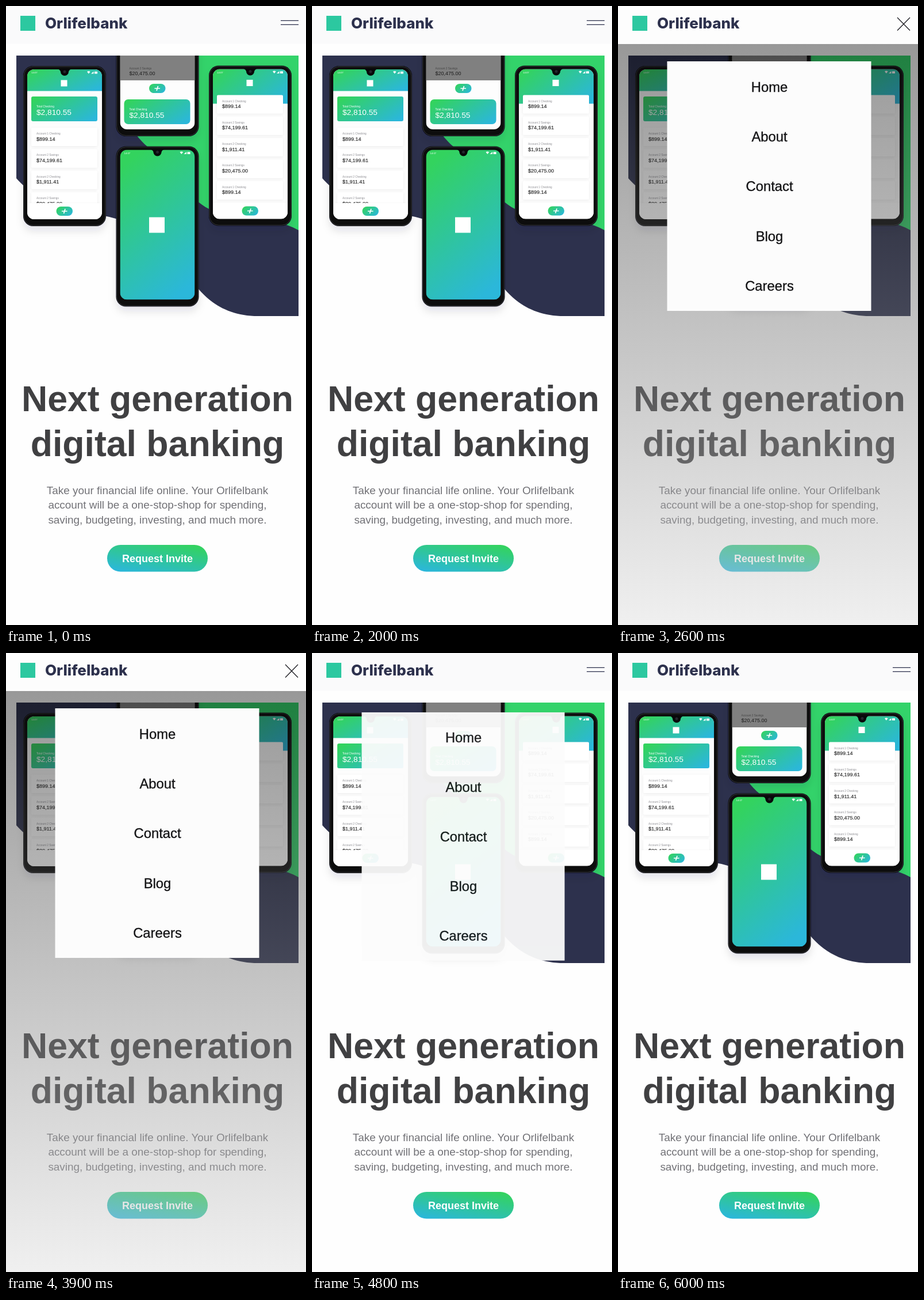
An HTML page that plays this animation: 522x1074 px, repeating every 6100 ms.

```html
<!DOCTYPE html>
<html lang="en">
<head>
<meta charset="utf-8">
<title>Digital banking</title>
<style>
  html, body { margin: 0; width: 100%; height: 100%; overflow: hidden; background: #fefefe; }
  svg { display: block; width: 100vw; height: 100vh; }
  text { font-family: "Liberation Sans", Arial, sans-serif; }
  .brand { font: 800 26px Inter, sans-serif; fill: #2d314d; }
  .title { font-size: 62.6px; font-weight: 700; fill: #404042; }
  .copy { font-size: 18.9px; fill: #717176; }
  .button { font-size: 18px; font-weight: 700; fill: #fff; }
  .link { font-size: 23.8px; fill: #151517; stroke: #151517; stroke-width: .35; }
  .mid { text-anchor: middle; }
</style>
</head>
<body>
<svg viewBox="0 0 522 1074" preserveAspectRatio="none">
  <defs>
    <linearGradient id="brandGrad" x1="0" y1=".2" x2="1" y2=".8">
      <stop stop-color="#33d35e"/><stop offset="1" stop-color="#2bb7da"/>
    </linearGradient>
    <linearGradient id="splashGrad" x1=".3" y1="0" x2=".7" y2="1">
      <stop stop-color="#33d35e"/><stop offset="1" stop-color="#2bb7da"/>
    </linearGradient>
    <linearGradient id="buttonGrad" x1=".15" y1="1" x2=".85" y2="0">
      <stop stop-color="#2bb7da"/><stop offset="1" stop-color="#33d35e"/>
    </linearGradient>
    <linearGradient id="dimGrad" x1="0" y1="0" x2="0" y2="1">
      <stop stop-color="#000"/><stop offset="1" stop-color="#dadada"/>
    </linearGradient>
    <clipPath id="heroClip"><rect x="18" y="86" width="491" height="560"/></clipPath>
    <clipPath id="screenClip"><rect x="7" y="6" width="130" height="260" rx="12"/></clipPath>
    <filter id="shadow" x="-20%" y="-10%" width="140%" height="125%">
      <feDropShadow dx="0" dy="9" stdDeviation="7" flood-color="#223" flood-opacity=".1"/>
    </filter>
    <filter id="cardShadow" x="-10%" y="-20%" width="120%" height="150%">
      <feDropShadow dx="0" dy="1" stdDeviation="2" flood-opacity=".07"/>
    </filter>
  </defs>

  <rect width="522" height="1074" fill="#fefefe"/>
  <g id="hero" clip-path="url(#heroClip)">
    <path fill="#2d314d" d="M18 86H509V538H432C387 536 356 516 335 491C300 440 260 385 180 366C105 350 60 345 18 299Z"/>
    <path fill="#33d36a" d="M193 86C195 190 222 222 245 243C290 290 318 334 353 352C400 372 460 362 509 389V86Z"/>
  </g>
  <g id="copy"></g>
  <rect x="176" y="935" width="175" height="46.500" rx="23.200" fill="url(#buttonGrad)"/>
  <text class="button mid" x="263.500" y="964.500">Request Invite</text>

  <rect id="dim" y="66" width="522" height="1008" fill="url(#dimGrad)" opacity=".4"/>
  <rect id="header" width="522" height="65.500"/>
  <rect x="25" y="17" width="26" height="26" fill="#2cc8a0"/>
  <text class="brand" x="68" y="38.500">Orlifelbank</text>
  <path id="burger" d="M478 25.300H509M478 32.300H509" stroke="#2d314d" stroke-width="1.300"/>
  <path id="cross" d="M486 20L508 42.500M508 20L486 42.500" stroke="#1c1c22" stroke-width="1.300"/>
  <g id="menu"><rect x="-177.500" y="-216.500" width="355" height="433" fill="#fcfcfc"/></g>
</svg>
<script>
const $ = id => document.getElementById(id);
const rect = (x, y, w, h, fill, rx = 0, extra = '') =>
  `<rect x="${x}" y="${y}" width="${w}" height="${h}" rx="${rx}" fill="${fill}" ${extra}/>`;
const text = (x, y, size, fill, str, extra = '') =>
  `<text x="${x}" y="${y}" font-size="${size}" fill="${fill}" ${extra}>${str}</text>`;
const brand = 'url(#brandGrad)';

const CHECK1 = ['Account 1 Checking', '$899.14'];
const SAVE2 = ['Account 2 Savings', '$74,199.61'];
const CHECK2 = ['Account 2 Checking', '$1,911.41'];
const SAVE3 = ['Account 2 Savings', '$20,475.00'];

// Phone parts use coordinates relative to the phone's top left corner.
const account = ([label, value], y) =>
  rect(14, y, 115, 32, '#fff', 2, 'filter="url(#cardShadow)"') +
  text(23, y + 12, 4.7, '#8b8b90', label) +
  text(23, y + 22.6, 9, '#333', value, 'stroke="#333" stroke-width=".2"');

const totalCard = (y, r) =>
  rect(14, y, 115, 43, brand, r) +
  text(23, y + 19, 4.7, '#fff', 'Total Checking') +
  text(23, y + 32, 13.7, '#fff', '$2,810.55');

const plus = y => rect(57.500, y, 28.500, 16, brand, 8) +
  `<path d="M67 ${y + 8}h9.500M73 ${y + 4}l-2.500 8" stroke="#fff" stroke-width="1.700"/>`;

const bottomBar = rect(7, 238, 130, 28, '#fff', 0, 'filter="url(#cardShadow)"') + plus(244);

const statusBar = text(14, 13, 4.3, '#fff', '14:07') +
  `<path d="M111 10q2.800-2 5.600 0l-2.800 3.500zM118 13.500l4.500-4v4zM124 9.700h5v3.800h-5z" fill="#fff"/>`;

const notch = `<path d="M59 5Q64 6 65 10A7 7 0 0 0 79 10Q80 6 85 5Z" fill="#08080a"/>
  <circle cx="72" cy="10" r="2.500" fill="#24262c"/>`;

const phone = (x, y, screen, face = true) => `<g transform="translate(${x} ${y})">
  <g filter="url(#shadow)">${rect(0, 0, 144, 278, '#08080a', 17)}</g>
  ${rect(1.2, 1.2, 141.6, 275.6, 'none', 16, 'stroke="#44454b" stroke-width=".7"')}
  <g clip-path="url(#screenClip)">${screen}</g>${face ? statusBar + notch : ''}</g>`;

const white = rect(7, 6, 130, 260, '#fdfdfd');
const logo = (x, y, size) => rect(x - size / 2, y - size / 2, size, size, '#fff');

const overview = white + rect(7, 6, 130, 37.500, brand) + logo(71, 30, 11) + totalCard(53, 3) +
  [CHECK1, SAVE2, CHECK2, SAVE3].map((a, i) => account(a, 107 + i * 37.4)).join('') + bottomBar;

const accounts = white + rect(7, 6, 130, 60, brand) + logo(71, 30, 11) +
  [CHECK1, SAVE2, CHECK2, SAVE3, CHECK1].map((a, i) => account(a, 51 + i * 37.3)).join('') + bottomBar;

const transfer = white + rect(7, 6, 130, 175, '#808080') +
  text(23, 161.500, 4.7, '#444', SAVE3[0]) +
  text(23, 172, 9, '#1d1d1d', SAVE3[1]) +
  plus(187) + totalCard(214, 7);

const splash = rect(7, 6, 130, 260, 'url(#splashGrad)') + logo(71, 136.500, 27);

$('hero').innerHTML += phone(30, 104, overview) + phone(191.500, -52, transfer, false) +
  phone(191.500, 243.500, splash) + phone(353, 103.500, accounts);

const centred = (cls, x, y, str) => `<text class="${cls} mid" x="${x}" y="${y}">${str}</text>`;

$('copy').innerHTML =
  ['Next generation', 'digital banking'].map((s, i) => centred('title', 263.5, 703 + i * 78, s)).join('') +
  ['Take your financial life online. Your Orlifelbank',
   'account will be a one-stop-shop for spending,',
   'saving, budgeting, investing, and much more.']
    .map((s, i) => centred('copy', 263.5, 846.5 + i * 25.8, s)).join('');

$('menu').innerHTML += ['Home', 'About', 'Contact', 'Blog', 'Careers']
  .map((s, i) => centred('link', 0.5, -164 + i * 86.4, s)).join('');

const LOOP = 6100, STEP = 100, OPEN = 2055, CLOSE = 4755, FADE = 320;
const ease = p => { p = Math.min(1, Math.max(0, p)); return p * p * (3 - 2 * p); };
const show = (id, on) => $(id).setAttribute('visibility', on ? 'visible' : 'hidden');

function render(ms) {
  const t = Math.floor(ms % LOOP / STEP) * STEP;
  const open = t >= OPEN && t < CLOSE;
  const amount = t < CLOSE ? ease((t - OPEN) / FADE) : 1 - ease((t - CLOSE) / FADE);
  show('dim', open);
  show('cross', open);
  show('burger', !open);
  $('header').setAttribute('fill', open ? '#fdfdfd' : '#fafafb');
  // The closing menu sits slightly lower and shrinks as it fades.
  const y = t < CLOSE ? 312.5 : 318.3;
  $('menu').setAttribute('transform', `translate(263 ${y}) scale(${0.9 + 0.1 * amount})`);
  $('menu').setAttribute('opacity', amount);
}

const start = performance.now();
(function tick() {
  render(performance.now() - start);
  requestAnimationFrame(tick);
})();
</script>
</body>
</html>
```
